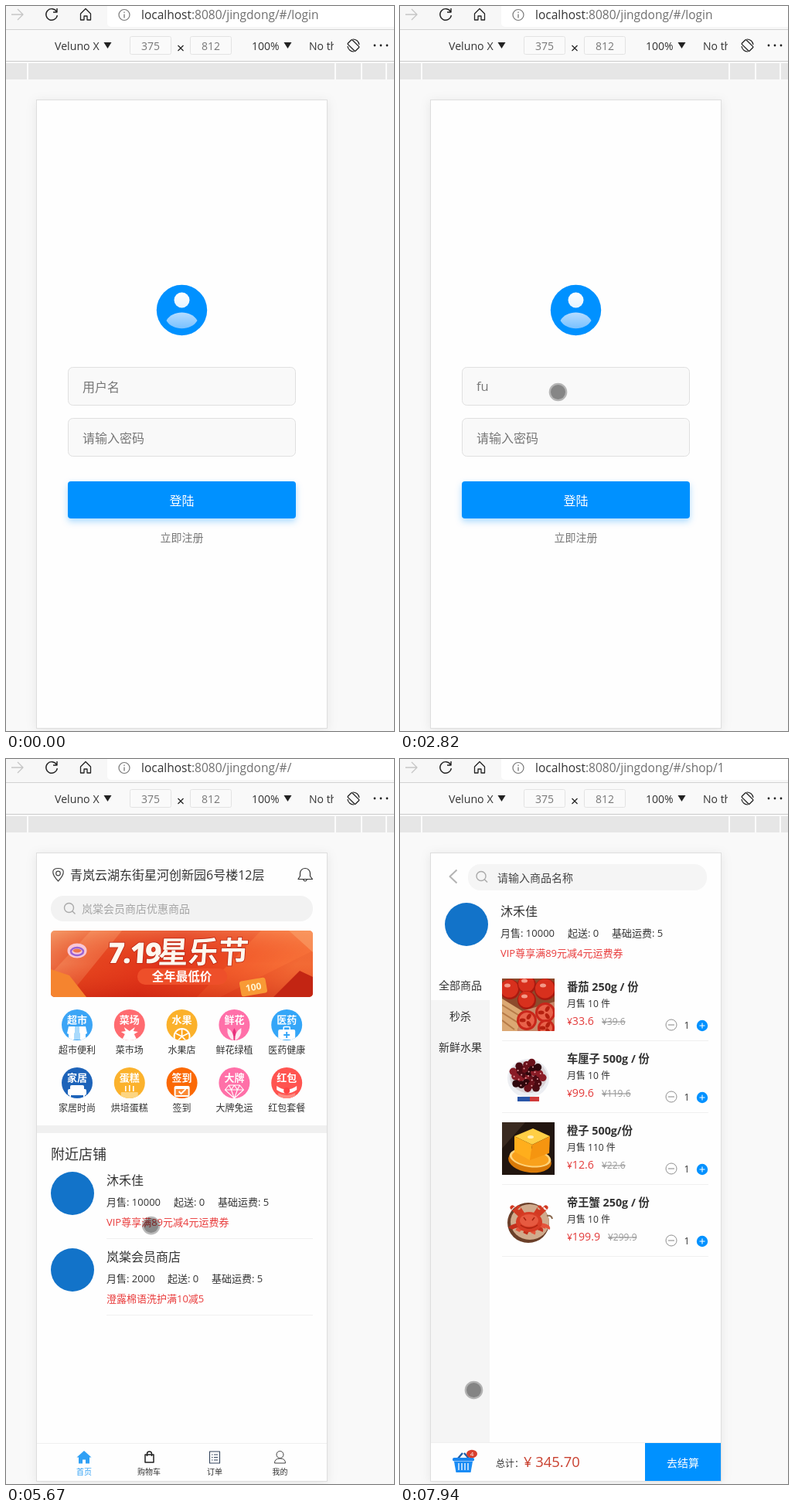
Write an HTML page that moves like this. It is 502 px wide and 938 px high and loops after 8 s.

```html
<!DOCTYPE html>
<html lang="zh-CN">
<head>
<meta charset="utf-8">
<title>Shop login</title>
<style>
html, body { margin: 0; width: 100%; height: 100%; overflow: hidden; background: #f9f9f9; }
svg { display: block; width: 502px; height: 938px; }
text { font-family: "Open Sans", "Noto Sans CJK SC", "Noto Sans CJK", sans-serif; white-space: pre; }
</style>
</head>
<body>
<svg id="stage" viewBox="0 0 502 938" xmlns="http://www.w3.org/2000/svg"></svg>
<script>
const LOOP = 8000, HOME_AT = 5440, SHOP_AT = 6640;
const BLUE = '#0091ff', RED = '#e33b3b', INK = '#333', GREY = '#777', W = '#fff';

// Drawing helpers; text is placed by its visual middle.
const text = (x, cy, size, str, fill = INK, extra = '') =>
  `<text x="${x}" y="${cy + size * 0.365}" font-size="${size}" fill="${fill}" ${extra}>${str}</text>`;
const mid = (x, cy, size, str, fill = INK, extra = '') =>
  text(x, cy, size, str, fill, 'text-anchor="middle" ' + extra);
const rect = (x, y, w, h, fill, r = 0, extra = '') =>
  `<rect x="${x}" y="${y}" width="${w}" height="${h}" rx="${r}" fill="${fill}" ${extra}/>`;
const circle = (x, y, r, fill, extra = '') =>
  `<circle cx="${x}" cy="${y}" r="${r}" fill="${fill}" ${extra}/>`;
const oval = (x, y, rx, ry, fill, extra = '') =>
  `<ellipse cx="${x}" cy="${y}" rx="${rx}" ry="${ry}" fill="${fill}" ${extra}/>`;
const shape = (d, fill, extra = '') => `<path d="${d}" fill="${fill}" ${extra}/>`;
const line = (d, color, w = 1) =>
  `<path d="${d}" fill="none" stroke="${color}" stroke-width="${w}" stroke-linejoin="round"/>`;
const group = (x, y, body, extra = '') => `<g transform="translate(${x} ${y})" ${extra}>${body}</g>`;
const layer = (id, body) => `<g id="${id}">${body}</g>`;
const search = (x, y) => circle(x, y, 6, 'none', 'stroke="#aaa" stroke-width="1.4"') +
  line(`M${x + 4} ${y + 4}l4 4`, '#aaa', 1.4);

const gradient = (id, dir, ...stops) => `<linearGradient id="${id}" ${dir}>` +
  stops.map((c, i) => `<stop offset="${i / (stops.length - 1)}" stop-color="${c}"/>`).join('') +
  '</linearGradient>';
const down = 'x1="0" y1="0" x2="0" y2="1"';

const defs = `<defs>
${gradient('head', down, '#fff', '#e6f4ff')}
${gradient('body', down, '#b5dcff', '#79c1ff')}
${gradient('banner', 'x1="0" y1="0" x2="1" y2="0.2"', '#f08a5c', '#e5441f', '#e0331a', '#ea4a22', '#f26a35')}
${gradient('shade', down, 'rgba(255,190,130,0.3)', 'rgba(230,60,20,0)', 'rgba(190,25,10,0.45)')}
<filter id="soft" x="-20%" y="-20%" width="140%" height="140%"><feDropShadow dx="0" dy="2" stdDeviation="7" flood-opacity="0.08"/></filter>
<filter id="glow" x="-10%" y="-30%" width="120%" height="180%"><feDropShadow dx="0" dy="4" stdDeviation="4" flood-color="${BLUE}" flood-opacity="0.32"/></filter>
<clipPath id="disc">${circle(0, 0, 20, '#000')}</clipPath>
<clipPath id="strip">${rect(58, 222, 339, 86, '#000', 5)}</clipPath>
<clipPath id="photo">${rect(0, 0, 68, 68, '#000')}</clipPath>
<clipPath id="menu">${rect(390, 35, 34, 34, '#000')}</clipPath>
</defs>`;

function browser() {
  const arrow = x => shape(`M${x} 47h10l-5 8z`, '#222');
  const size = (x, n) => rect(x + 0.5, 39.5, 53, 23, '#fafafa', 2, 'stroke="#e3e3e3"') + mid(x + 27, 51.5, 14, n, GREY);
  return rect(0, 0, 502, 938, '#f9f9f9') + rect(0, 0, 502, 30, '#f7f7f7') +
    rect(131, -10, 400, 37, W, 5) +
    line('M7 11H22M15 4l7 7-7 7', '#c6c6c6', 1.3) +
    line('M65.5 7.5A7.3 7.3 0 1 0 66.3 12M66 3v5h-5', '#222', 1.4) +
    line('M96.5 10l6.5-6.5 6.5 6.5v8h-4.5v-5h-4v5h-4.5z', '#222', 1.3) +
    circle(153, 11.5, 7, 'none', 'stroke="#777" stroke-width="1.2"') +
    line('M153 10.5v5M153 7.5v1.5', '#777', 1.3) +
    `<text id="url" x="175" y="17.4" font-size="15.5" fill="#6f6f6f"><tspan fill="#333">localhost</tspan><tspan id="path"></tspan></text>` +
    rect(0, 30, 502, 1, '#d2d2d2') + rect(0, 71, 502, 1, '#cbcbcb') +
    text(63, 51.5, 14.2, 'Veluno X') + arrow(126.5) +
    size(160, '375') + line('M222.5 51l7 7M229.5 51l-7 7', '#222', 1.2) + size(238, '812') +
    text(318, 51.5, 14, '100%') + arrow(359.5) +
    `<g clip-path="url(#menu)">${text(392, 51.5, 14, 'No throttling')}</g>` +
    group(449.5, 51, rect(-4, -7, 8, 14, 'none', 1, 'transform="rotate(-45)" stroke="#222" stroke-width="1.3"') +
      line('M-7.5 1A8 8 0 0 0 1 8M7.5 -1A8 8 0 0 0 -1 -8', '#222', 1.2)) +
    [477, 485, 493].map(x => circle(x, 51, 1.4, '#222')).join('') +
    rect(0, 74, 502, 21, '#e6e6e6') +
    [27, 425, 459, 491].map(x => rect(x, 74, 2, 21, '#fbfbfb')).join('') +
    rect(39.5, 121.5, 376, 813, '#fefefe', 0, 'stroke="#dedede" filter="url(#soft)"');
}

function login() {
  const field = y => rect(80.5, y, 294, 49, '#f9f9f9', 6, 'stroke="#e0e0e0"');
  return circle(227.5, 393.5, 32.7, BLUE) + circle(227.5, 380.5, 10, 'url(#head)') +
    shape('M207.5 407Q213 396.5 227.5 396.5T247.5 407Q241 417 227.5 417T207.5 407z', 'none') +
    shape('M207.5 407C215 393 240 393 247.5 407C240 420.5 215 420.5 207.5 407z', 'url(#body)') +
    field(467.5) + field(533.5) +
    layer('userHint', text(99, 493, 16, '用户名', GREY)) +
    `<text id="user" x="99" y="498" font-size="16.5" fill="${GREY}"></text>` +
    layer('passHint', text(99, 559, 16, '请输入密码', GREY)) +
    [0, 1, 2].map(i => layer('dot' + i, circle(102.5 + i * 6.9, 559, 2.6, GREY))).join('') +
    layer('eye', line('M337.5 563C339 549 355 549 356.5 563', '#222', 1.4) +
      circle(347, 560, 3.7, 'none', 'stroke="#222" stroke-width="1.4"')) +
    rect(0, 0, 1, 21, '#444', 0, 'id="caret"') +
    rect(80, 615, 295, 48, BLUE, 4, 'filter="url(#glow)"') +
    mid(227.5, 640, 16, '登陆', W) + mid(227.5, 687.5, 14, '立即注册', GREY);
}

const shopInfo = (y, name, sales, promo, dx = 0) =>
  circle(86, y + 16.5, 28, '#1273c9') + text(130, y, 16, name) +
  text(130, y + 27.5, 13, '月售: ' + sales) + text(217 + dx, y + 27.5, 13, '起送: 0') +
  text(274 + dx, y + 27.5, 13, '基础运费: 5') + text(130, y + 53.5, 13, promo, '#e93b3b');

function banner() {
  return `<g clip-path="url(#strip)">` + rect(58, 222, 339, 86, 'url(#banner)') +
    shape('M110 222h40l-70 86H58v-30z', '#f9a070', 'opacity="0.35"') +
    shape('M330 222h67v26l-120 60h-30z', '#ff7d3c', 'opacity="0.35"') +
    rect(58, 222, 339, 86, 'url(#shade)') +
    shape('M58 272l24 8 22 28H58z', '#f5842f') + shape('M346 308l34-34 17 8v26z', '#c32513') +
    shape('M366 222h31v28z', '#fba06a', 'opacity="0.6"') +
    group(92, 248, oval(0, 0, 9, 6, 'none', 'stroke="#f9c6d6" stroke-width="7"') +
      oval(0, 1, 8, 5, 'none', 'stroke="#9a63d2" stroke-width="2.5"'), '') +
    `<g transform="translate(320 295) rotate(-10)">` + rect(-17, -10, 34, 20, '#f89a35', 3) +
    mid(0, 0, 12, '100', '#fff3cf', 'font-weight="700"') + '</g>' +
    rect(170, 271, 116, 21, '#ee4f2a', 10) + mid(227.5, 281.5, 15.5, '全年最低价', W, 'font-weight="700"') +
    `<g transform="translate(86 250) skewX(-4)" font-weight="800" stroke="#b92412" stroke-width="1.5" paint-order="stroke">` +
    text(46, 0, 37, '7.19', '#fff8ee', 'letter-spacing="-2"') + text(111, 0, 39, '星乐节', '#fff8ee') + '</g></g>';
}

// name, caption, colour, pictogram around the disc's centre
const cats = [
  ['超市', '超市便利', '#3ca5f6', rect(-5, 2, 10, 17, '#a9dafc') +
    shape('M-11 2h8v8q-4 5-10 1zM11 2H3v8q4 5 10 1z', W) + shape('M-11 10h7v9h-7zM4 10h7v9H4z', W)],
  ['菜场', '菜市场', '#ff6b70', shape('M0 8l-7-5 2 5-6 1 5 3-4 8h20l-4-8 5-3-6-1 2-5z', W)],
  ['水果', '水果店', '#fbb12b', circle(0, 15, 11, W) + circle(0, 15, 9, '#fba41c') +
    line('M0 15V6M0 15l-8-4M0 15l8-4M0 15l-6 6M0 15l6 6', W, 1.6)],
  ['鲜花', '鲜花绿植', '#ff70a9', shape('M0 4q5 8 0 17-5-9 0-17z', '#e8307c') +
    shape('M-9 4q9 5 8 16-9-4-8-16zM9 4q-9 5-8 16 9-4 8-16z', '#ffe6f0')],
  ['医药', '医药健康', '#34a6f8', rect(-11, 6, 22, 13, W, 2) + rect(-4, 2.5, 8, 5, 'none', 1, 'stroke="#fff" stroke-width="1.5"') +
    line('M0 9v8M-4 13h8', '#34a6f8', 2)],
  ['家居', '家居时尚', '#1d63b9', rect(-9, 3, 18, 10, W, 2) + rect(-12, 8, 24, 8, W, 2) + line('M-9 15v4M9 15v4', W, 2)],
  ['蛋糕', '烘培蛋糕', '#fbb22d', line('M-5 4v7M0 3v8M5 4v7', W, 1.6) + rect(-11, 12, 22, 8, '#fdd580', 1)],
  ['签到', '签到', '#fb6905', rect(-10, 4, 20, 14, W, 2) + rect(-8, 8, 16, 8, '#fb8a34') + line('M-4 11l3 3 6-6', W, 1.8)],
  ['大牌', '大牌免运', '#ff70a8', line('M-7 3H7l5 6L0 20-12 9zM-12 9h24M-7 3l3 6 4 11 4-11 3-6M-4 9l4-6 4 6', W, 1.1)],
  ['红包', '红包套餐', '#ff5450', shape('M-13 4q13 9 26 0v5q-13 9-26 0z', W) + circle(0, 10, 4, '#f44') +
    shape('M-11 13q11 6 22 0v8h-22z', '#ff8a80')]
];

const category = ([name, label, color, art], i) => {
  const x = 92 + (i % 5) * 67.8, y = i < 5 ? 344 : 419;
  return group(x, y, circle(0, 0, 20, color) + `<g clip-path="url(#disc)">${art}</g>` +
    mid(0, -7, 13, name, W, 'font-weight="700"') + mid(0, 33, 12, label));
};

function home() {
  const tabs = [['首页', 101], ['购物车', 185], ['订单', 270], ['我的', 354.5]];
  return shape('M67.5 158C58 148 59 141.5 67.5 141.5S77 148 67.5 158z', 'none', 'stroke="#444" stroke-width="1.2"') +
    circle(67.5, 148, 2.8, 'none', 'stroke="#444" stroke-width="1.2"') +
    text(83, 150.5, 16, '青岚云湖东街星河创新园6号楼12层') +
    line('M378 155.5h18.5l-3-4v-4q-1-6-6.5-6t-6.5 6v4zM384.500 156q2.500 4 5 0', INK, 1.2) +
    rect(58, 177, 339, 33, '#f2f2f2', 16) + search(81.5, 192.5) +
    text(98, 193.5, 14, '岚棠会员商店优惠商品', '#a5a5a5') + banner() +
    cats.map(category).join('') + rect(40, 474, 375, 10, '#f0f0f0') +
    text(58, 511, 18, '附近店铺') +
    shopInfo(545.5, '沐禾佳', '10000', 'VIP尊享满89元减4元运费券') + rect(130, 620, 267, 1, '#f0f0f0') +
    shopInfo(644.5, '岚棠会员商店', '2000', '澄露棉语洗护满10减5', -8) + rect(130, 719, 267, 1, '#f0f0f0') +
    rect(40, 885, 375, 1, '#efefef') +
    shape('M101 895l9.5 8.5h-2.5v8h-5v-5h-4v5h-5v-8h-2.500z', '#2fa0f5') +
    line('M180 900h11v10h-11zM182.5 902v-3q0-3 3-3t3 3v3', '#222', 1.5) +
    line('M263.5 896h13v15h-13zM266 900h1.5M269 900h5M266 903.5h1.5M269 903.5h5M266 907h1.5M269 907h5', '#35455c', 1.1) +
    circle(354.5, 900, 4.5, 'none', 'stroke="#444"') + line('M347.5 911q0-6 7-6t7 6z', '#444') +
    tabs.map(([s, x], i) => mid(x, 922, 10, s, i ? INK : '#2fa0f5')).join('');
}

// Discs spread in a sunflower pattern inside an oval
const heap = (n, rx, ry, r, pick) => Array.from({ length: n }, (_, i) => {
  const a = i * 2.4, k = Math.sqrt(i / n);
  return circle((34 + Math.cos(a) * rx * k).toFixed(1), (33 + Math.sin(a) * ry * k).toFixed(1), r, pick(i));
}).join('');
const tomato = (x, y, r) => circle(x, y, r, '#a81a10') + circle(x - 0.5, y - 1, r - 1.5, '#d8301d') +
  oval(x - 3, y - 5, 4, 2.5, '#f39a88');
const slice = (x, y, r) => circle(x, y, r, '#c9261a') + circle(x, y, r - 3, '#e8624a') +
  [30, 150, 270].map(a => oval(x, y, 2.5, 4, '#b5200f', `transform="rotate(${a} ${x} ${y}) translate(0 ${-r * 0.42})"`)).join('');
const leg = (x, y, bend, color) => line(`M35 38Q${x + bend} ${y - 4} ${x} ${y}`, color, 6);

const photos = [
  rect(0, 0, 68, 68, '#8c4a2c') + tomato(10, 14, 13) + tomato(32, 8, 12) + tomato(56, 14, 14) + tomato(32, 28, 12) +
    shape('M0 26L26 42 20 68H0z', '#dba873') + line('M0 34L24 49M0 44L22 58M0 54L16 66', '#b67b48', 2) +
    shape('M26 42L68 30V68H20z', '#c8896a') + slice(32, 54, 13) + slice(56, 44, 13) + slice(57, 64, 11),
  oval(34, 36, 27, 25, '#eceef2') + oval(34, 34, 24, 21, '#d9d3d6') +
    heap(26, 21, 19, 4.8, i => ['#4a0a12', '#8a1c26', '#2e070c', '#6a111a'][i % 4]) +
    heap(18, 19, 17, 1, () => '#e5a0a4') +
    rect(20, 60, 16, 6, '#2a56a8') + rect(36, 60, 12, 6, '#d03a3a'),
  rect(0, 0, 68, 68, '#21150f') + shape('M0 0h30L0 34z', '#3a2a20') +
    `<g transform="rotate(8 36 50)">` + oval(36, 50, 28, 15, '#d97a08') + oval(36, 46, 27, 12, '#ffd37a') +
    oval(36, 46, 24, 10, '#f9a11c') + '</g>' +
    shape('M16 18l24-10 22 10-23 11z', '#ffcf45') + shape('M16 18l23 11-3 20-20-11z', '#ffae1c') +
    shape('M62 18L39 29l-3 20 25-9z', '#f59510') + oval(37, 19, 4, 2, '#fff0bd'),
  oval(34, 37, 27, 26, '#6b3f29') + oval(36, 36, 25, 23, '#d0aa8c') + line('M58 28q6-1 7 4', '#8a6a50', 2) +
    [14, 22, 48, 56].map((x, i) => leg(x, 18, i < 2 ? -4 : 4, '#d23a22')).join('') +
    [11, 20, 30, 40, 50, 59].map((x, i) => leg(x, 53 - Math.abs(x - 35) * 0.35, 2, i % 2 ? '#e4533a' : '#c42f1c')).join('') +
    oval(35, 36, 17, 13, '#d63c25') + oval(35, 34, 12, 8, '#e65a40') +
    line('M24 40q11 8 22 0M28 30l3 4M42 30l-3 4', '#a9230f', 1.5)
];

const goods = [
  ['番茄 250g / 份', 10, '33.6', '39.6'],
  ['车厘子 500g / 份', 10, '99.6', '119.6'],
  ['橙子 500g/份', 110, '12.6', '22.6'],
  ['帝王蟹 250g / 份', 10, '199.9', '299.9']
];

const product = ([name, sold, price, was], i) => {
  const x = price.length > 4 ? 269 : 261;
  return group(0, i * 93, group(132, 284, photos[i], 'clip-path="url(#photo)"') +
    text(216, 294.5, 14.3, name, INK, 'font-weight="700"') + text(216, 317, 12, `月售 ${sold} 件`) +
    text(216, 339.5, 12, '¥', RED) + text(222.8, 339, 14.2, price, RED) +
    text(x, 340, 12, '¥' + was, '#999', 'text-decoration="line-through"') +
    circle(351, 344, 7, W, 'stroke="#8f8f8f"') + line('M347 344h8', '#8f8f8f', 1.1) +
    mid(371, 344, 12.5, '1') + circle(391, 345, 7.2, BLUE) + line('M387.5 345h7M391 341.5v7', W, 1.1) +
    rect(132, 364, 267, 1, '#f0f0f0'));
};

function shop() {
  return line('M73.5 143.5l-9 8.5 9 8.5', '#b3b3b3', 2) + rect(88, 136, 309, 34, '#f5f5f5', 16) +
    search(105, 151.5) + text(126, 154, 14, '请输入商品名称', '#444') +
    shopInfo(197.5, '沐禾佳', '10000', 'VIP尊享满89元减4元运费券') +
    rect(40, 312, 76, 572, '#f5f5f5') +
    ['全部商品', '秒杀', '新鲜水果'].map((s, i) => mid(78, 292.5 + i * 40, 14, s)).join('') +
    goods.map(product).join('') +
    rect(40, 884, 375, 1, '#efefef') +
    line('M74 906l7-8M90 906l-7-8', '#1f5fa8', 2.4) + rect(68, 904, 28, 4.5, '#1a86f0', 2) +
    shape('M70 909h24l-2.5 14h-19z', '#1a8cf5') + line('M76 911v9M80 911v9M84 911v9M88 911v9', W, 1.3) +
    oval(93, 899, 7, 5.2, '#d9402f') + mid(93, 899, 8, '4', W) +
    text(124, 911.5, 12, '总计：') + text(160, 909, 18.4, '¥ 345.70', '#c9402f') +
    rect(317, 885, 98, 49, BLUE) + mid(366, 910.5, 14, '去结算', W);
}

document.getElementById('stage').innerHTML = defs + browser() + layer('login', login()) +
  layer('home', home()) + layer('shop', shop()) +
  layer('pointer', circle(0.5, 0.5, 11.8, 'rgba(0,0,0,0.27)') + circle(0.5, 0.5, 9.5, 'rgba(0,0,0,0.26)'));

const el = id => document.getElementById(id);
const show = (id, on) => el(id).setAttribute('display', on ? 'inline' : 'none');

// start, end, then the three points of a quadratic curve
const moves = [
  [60, 860, 424, 950, 330, 560, 204, 499],
  [4460, 5240, 204, 499, 285, 665, 232, 644],
  [5420, 6090, 232, 644, 160, 575, 95, 533],
  [6220, 6250, 95, 533, 95, 532, 96, 531],
  [6680, 7020, 96, 531, 96, 545, 95, 562],
  [7180, 7940, 95, 562, 37, 470, 95, 816]
];

function pointerAt(t) {
  const [a, b, x0, y0, cx, cy, x1, y1] = moves.filter(m => t >= m[0]).pop();
  const p = Math.min(1, (t - a) / (b - a)), s = p * p * (3 - 2 * p), q = 1 - s;
  return [q * q * x0 + 2 * q * s * cx + s * s * x1, q * q * y0 + 2 * q * s * cy + s * s * y1];
}

// time and caret place; a null place means hidden
const USER_Y = 482, PASS_Y = 548;
const carets = [
  [0, null], [960, 99, USER_Y], [1440, null], [1930, 99, USER_Y], [2230, 105, USER_Y], [2330, 114, USER_Y],
  [2820, null], [2970, 124, USER_Y], [3460, null], [3660, 99, PASS_Y], [3920, 106, PASS_Y], [4050, 113, PASS_Y],
  [4180, 120, PASS_Y], [4680, null], [5180, 120, PASS_Y], [5340, null]
];
const userKeys = [2230, 2330, 2970], passKeys = [3920, 4050, 4180];
const typed = (keys, t) => keys.filter(k => t >= k).length;

function render(t) {
  const page = t < HOME_AT ? 'login' : t < SHOP_AT ? 'home' : 'shop';
  ['login', 'home', 'shop'].forEach(id => show(id, id === page));
  el('path').textContent = ':8080/jingdong/#/' + { login: 'login', home: '', shop: 'shop/1' }[page];

  const chars = typed(userKeys, t), dotsOn = typed(passKeys, t);
  el('user').textContent = 'fua'.slice(0, chars);
  show('userHint', !chars);
  show('passHint', !dotsOn);
  [0, 1, 2].forEach(i => show('dot' + i, i < dotsOn));
  show('eye', dotsOn && t < 5340);

  const [, x, y] = carets.filter(c => t >= c[0]).pop();
  show('caret', x !== null);
  if (x !== null) {
    el('caret').setAttribute('x', x);
    el('caret').setAttribute('y', y);
  }

  show('pointer', t >= 60);
  if (t >= 60) el('pointer').setAttribute('transform', `translate(${pointerAt(t).map(v => v.toFixed(2)).join(' ')})`);
}

const began = performance.now();
function tick() {
  render((performance.now() - began) % LOOP);
  requestAnimationFrame(tick);
}
tick();
</script>
</body>
</html>
```
